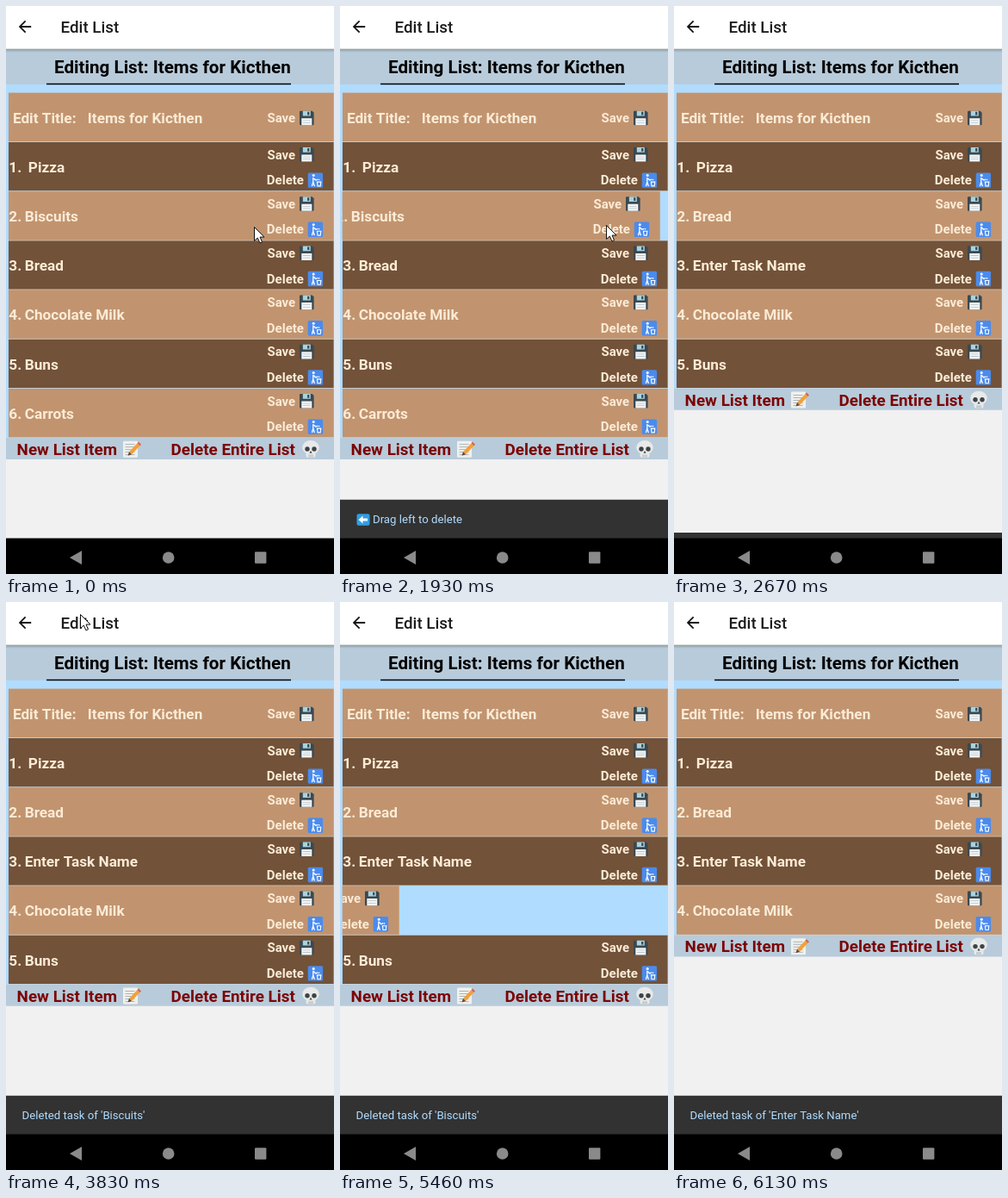
Write an HTML page with a canvas that moves like this. It is 381x659 px and loops after 6.8 s.

```html
<!DOCTYPE html>
<html lang="en">
<head>
<meta charset="utf-8">
<title>Edit List</title>
<style>
html, body { margin: 0; width: 100%; height: 100%; overflow: hidden; background: #f1f1f1; }
canvas { display: block; }
</style>
</head>
<body>
<canvas id="stage" width="381" height="659"></canvas>
<script>
const ctx = document.getElementById('stage').getContext('2d');
const LOOP = 6800, ROW = 57.2, LIST_TOP = 100.3, LEFT = 2.8, HAIRLINE = 0.5;
const SKY = '#b0dcff', BAND = '#b8cbda', TAN = '#c1946f', BROWN = '#725238', EDGE = '#cbb9a6';
const CREAM = '#fcebd6', MAROON = '#7c0303';

const lists = [
  { until: 2340, items: ['Pizza', 'Biscuits', 'Bread', 'Chocolate Milk', 'Buns', 'Carrots'] },
  { until: 5590, items: ['Pizza', 'Bread', 'Enter Task Name', 'Chocolate Milk', 'Buns'] },
  { until: LOOP, items: ['Pizza', 'Bread', 'Enter Task Name', 'Chocolate Milk'] }
];
const swipes = [
  { row: 2, from: 1900, to: 2210, end: 2340, shift: 320 },
  { row: 4, from: 5090, to: 5460, end: 5590, shift: 312 }
];
const snacks = [
  { show: 860, hide: 2340, text: 'Drag left to delete', arrow: true },
  { show: 2613, hide: 5590, text: "Deleted task of 'Biscuits'" },
  { show: 5813, hide: LOOP, text: "Deleted task of 'Enter Task Name'" }
];
// Pointer keys: time, x, y
const pointerPaths = [
  [[0, 288, 256], [180, 288, 256], [500, 315, 240], [820, 291, 256],
   [1500, 291, 256], [1730, 318, 254], [2210, 318, 254]],
  [[3830, 86, 14], [3870, 86, 14], [4450, 289, 418], [4510, 289, 418],
   [4660, 301, 425], [4860, 310, 372], [5460, 310, 372]]
];

const clamp = v => Math.min(1, Math.max(0, v));
const smooth = v => (v = clamp(v), v * v * (3 - 2 * v));

// cubic-bezier(.4, 0, .2, 1)
function standardEase(v) {
  v = clamp(v);
  let lo = 0, hi = 1, s = 0.5;
  for (let i = 0; i < 16; i++) {
    s = (lo + hi) / 2;
    const x = 1.2 * (1 - s) ** 2 * s + 0.6 * (1 - s) * s * s + s ** 3;
    if (x < v) lo = s; else hi = s;
  }
  return v === 1 ? 1 : s * s * (3 - 2 * s);
}

function box(color, x, y, w, h, r = 0) {
  ctx.fillStyle = color;
  ctx.beginPath();
  ctx.roundRect(x, y, w, h, r);
  ctx.fill();
}
function disc(color, x, y, rx, ry = rx) {
  ctx.fillStyle = color;
  ctx.beginPath();
  ctx.ellipse(x, y, rx, ry, 0, 0, 7);
  ctx.fill();
}
function shape(color, x, y, path, stroke, scale = 1) {
  ctx.save();
  ctx.translate(x, y);
  ctx.scale(scale, scale);
  const p = new Path2D(path);
  if (color) { ctx.fillStyle = color; ctx.fill(p); }
  if (stroke) { ctx.strokeStyle = stroke[0]; ctx.lineWidth = stroke[1]; ctx.stroke(p); }
  ctx.restore();
}
function label(text, x, y, size, color, weight = 700) {
  ctx.font = `${weight} ${size}px Roboto, sans-serif`;
  ctx.fillStyle = color;
  ctx.fillText(text, x, y);
}

// Icons are placed by their centre
function floppy(x, y) {
  shape('#3b4850', x, y, 'M-8.3 -7.3Q-8.3 -8.3 -7.3 -8.3H6.3L8.3 -6.3V7.3Q8.3 8.3 7.3 8.3H-7.3Q-8.3 8.3 -8.3 7.3Z');
  box('#a9d3de', x - 4.5, y - 8.3, 9, 5.8);
  box('#3b4850', x + 0.8, y - 7.2, 2.2, 3.6);
  box('#f3f5f6', x - 6, y + 0.2, 12, 8.1);
  box('#b9c5ca', x - 4.5, y + 2.4, 9, 0.8);
  box('#b9c5ca', x - 4.5, y + 5, 9, 0.8);
}
function litter(x, y) {
  box('#4a8bee', x - 8.7, y - 8.7, 17.4, 17.4, 1.5);
  disc('#fff', x - 2.2, y - 5.5, 1.5);
  shape(null, x, y, 'M-2.6 -3.2V2L-4 7M-2.6 2L-1 7M-2.4 -2.6L0.4 0L3 -1', ['#fff', 1.3]);
  shape(null, x, y, 'M2 2H6.4L5.8 6.8H2.6Z', ['#fff', 1.1]);
  disc('#fff', x + 4.2, y - 0.6, 0.8);
}
function memo(x, y) {
  box('#f0f0ed', x - 10, y - 9.5, 17, 19, 1);
  for (let i = 0; i < 5; i++) box('#a8adb0', x - 7.5, y - 6 + i * 3, 11, 0.9);
  shape('#f2a13a', x, y, 'M-3 3L6.5 -7L9.5 -4L0 6Z');
  shape('#d9604c', x, y, 'M6.5 -7L8 -8.5L11 -5.5L9.5 -4Z');
  shape('#5b4638', x, y, 'M-3 3L0 6L-4.5 7.5Z');
}
function skull(x, y) {
  disc('#e8e9e9', x, y - 1.8, 9.8, 8.2);
  box('#e8e9e9', x - 5.5, y + 3, 11, 6.7, 2);
  disc('#3d4245', x - 4, y, 2.7);
  disc('#3d4245', x + 4, y, 2.7);
  shape('#3d4245', x, y, 'M0 2L1.5 4.8H-1.5Z');
  for (const dx of [-2, 0, 2]) box('#92989b', x + dx - 0.3, y + 6.5, 0.7, 3);
}

function rowFrame(index, shift, content) {
  const y = LIST_TOP + index * ROW;
  ctx.save();
  ctx.beginPath();
  ctx.rect(LEFT, y, 381, ROW);
  ctx.clip();
  ctx.translate(-shift, y);
  box(EDGE, LEFT, 0, 381 - LEFT, ROW);
  box(index % 2 ? BROWN : TAN, LEFT, HAIRLINE, 381 - LEFT - HAIRLINE, ROW - 2 * HAIRLINE);
  content();
  ctx.restore();
}
function save(y) {
  label('Save', 303.5, y + 5.2, 14.95, CREAM);
  floppy(349.3, y);
}

function drawHeader() {
  box('#fff', 0, 0, 381, 50);
  box(BAND, 0, 50, 381, 41);
  const shadow = ctx.createLinearGradient(0, 49, 0, 54);
  shadow.addColorStop(0, '#0004');
  shadow.addColorStop(1, '#0000');
  box(shadow, 0, 49.5, 381, 5);
  shape('#111', 11.2, 13.2, 'M20 11H7.8L13.4 5.4L12 4L4 12L12 20L13.4 18.6L7.8 13H20Z', null, 0.9);
  label('Edit List', 63.6, 30.8, 18.75, '#1c1c1e', 500);
  label('Editing List: Items for Kicthen', 56, 77.5, 20.65, '#000');
  box('#000', 47, 89.7, 284, 1.5);
}

function drawList(t, shift) {
  const { items } = lists.find(l => t < l.until);
  const bottom = LIST_TOP + (items.length + 1) * ROW;
  box(SKY, 0, 91, 381, bottom - 91);
  rowFrame(0, 0, () => {
    label('Edit Title:', 7.9, 35.2, 17.22, CREAM);
    label('Items for Kicthen', 94.8, 35.2, 17.22, CREAM);
    save(29.7);
  });
  items.forEach((name, i) => {
    const n = i + 1;
    rowFrame(n, shift(n), () => {
      label(n + '.', 3.3, 35.2, 17.22, CREAM);
      label(name, n === 1 ? 25.8 : 21.7, 35.2, 17.22, CREAM);
      save(14.8);
      label('Delete', 302.8, 49.7, 15, CREAM);
      litter(359.4, 44.6);
    });
  });
  box(BAND, 0, bottom, 381, 25.3);
  label('New List Item', 12.6, bottom + 20, 18.85, MAROON);
  memo(146, bottom + 13.5);
  label('Delete Entire List', 191.6, bottom + 20, 18.85, MAROON);
  skull(354, bottom + 13.3);
}

function drawSnack(t, { show, hide, text, arrow }) {
  const open = standardEase((t - show) / 280) - standardEase((t - hide) / 200);
  if (open <= 0) return;
  const y = 617.5 - 44.8 * open;
  box('#323232', 0, y, 381, 46);
  ctx.globalAlpha = clamp((t - show - 70) / 205);
  if (arrow) {
    box('#2f9fe0', 19.5, y + 16.5, 15, 13.5, 2);
    shape('#fff', 27, y + 23.2, 'M-5.5 0L-0.5 -4.5V-1.5H5V1.5H-0.5V4.5Z');
  }
  label(text, arrow ? 38 : 18.6, y + 27.6, 13.2, SKY, 400);
  ctx.globalAlpha = 1;
}

function drawNavBar() {
  box('#000', 0, 617.5, 381, 42);
  shape('#8a8a8a', 74, 640, 'M0 0L14 -8V8Z');
  disc('#8a8a8a', 188.7, 640, 6.8);
  box('#8a8a8a', 289, 633.3, 13.4, 13.4, 1);
}

function drawPointer(t, dragged) {
  const path = pointerPaths.find(p => t >= p[0][0] && t < p[p.length - 1][0]);
  if (!path) return;
  const k = path.findIndex(key => t < key[0]);
  const [t0, x0, y0] = path[k - 1], [t1, x1, y1] = path[k];
  const f = smooth((t - t0) / (t1 - t0));
  shape('#fff', x0 + (x1 - x0) * f - dragged + 0.5, y0 + (y1 - y0) * f + 0.5,
    'M0 0V16L3.8 12.6L6.4 18.4L9 17.3L6.5 11.6H11.5Z', ['#111', 1]);
}

function draw(t) {
  box('#f1f1f1', 0, 0, 381, 659);
  const swipe = swipes.find(s => t >= s.from && t < s.end);
  const dragged = swipe ? swipe.shift * smooth((t - swipe.from) / (swipe.to - swipe.from)) : 0;
  drawList(t, n => swipe && swipe.row === n ? dragged : 0);
  drawHeader();
  snacks.forEach(s => drawSnack(t, s));
  drawNavBar();
  drawPointer(t, dragged);
}

const start = performance.now();
function tick() {
  draw((performance.now() - start) % LOOP);
  requestAnimationFrame(tick);
}
tick();
</script>
</body>
</html>
```
